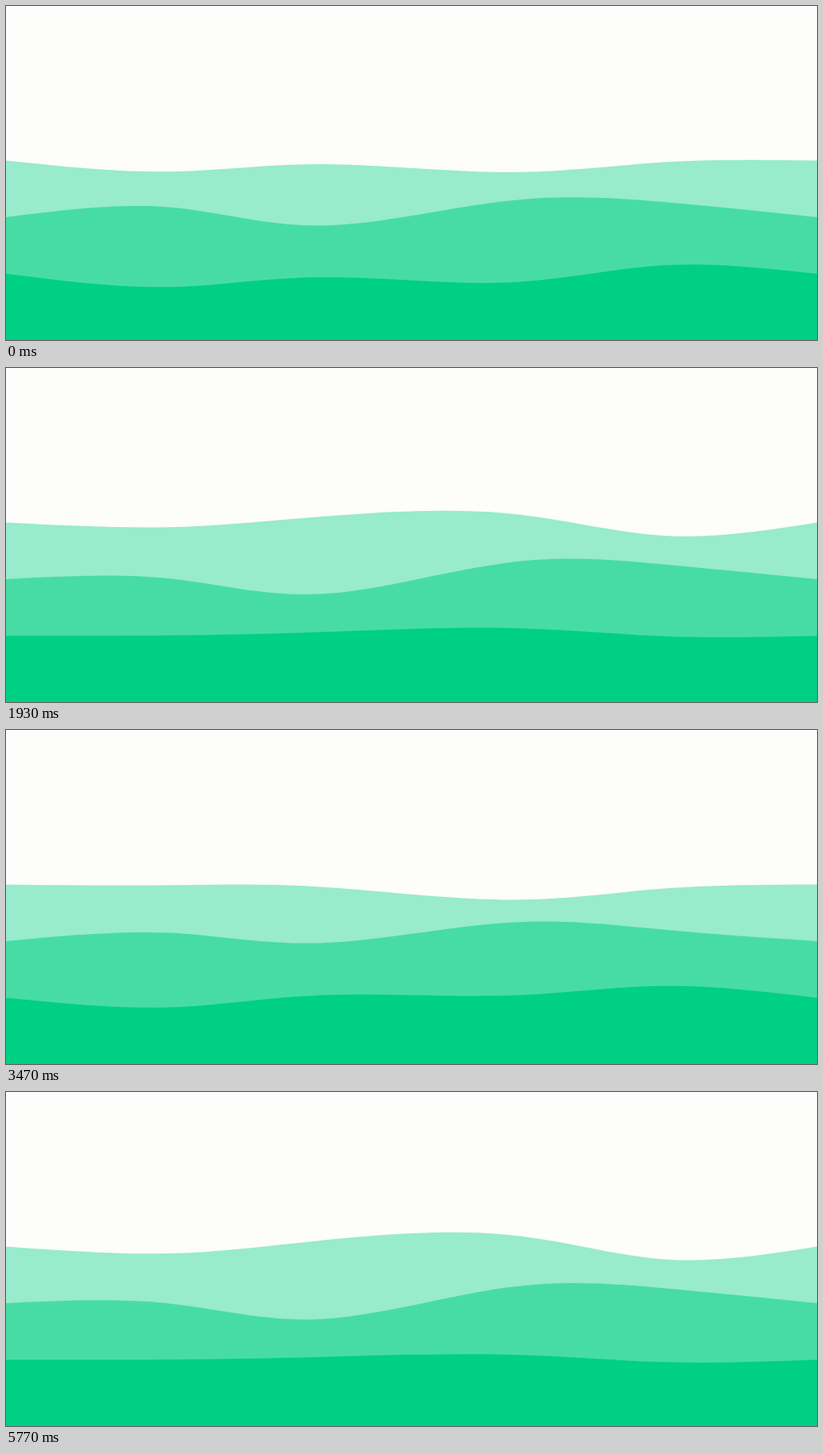
Write an HTML page that moves like this. It is 1008 by 416 pixels and loops after 5.81 s.

```html
<!DOCTYPE html>
<html lang="en">
<head>
<meta charset="utf-8">
<title>Green waves</title>
<style>
html, body { margin: 0; width: 100%; height: 100%; overflow: hidden; background: #fdfdfc; }
svg { display: block; width: 1008px; height: 416px; fill: #00d084; }
</style>
</head>
<body>
<svg viewBox="0 0 1008 416">
  <path fill-opacity=".4"/>
  <path fill-opacity=".53"/>
  <path/>
</svg>
<script>
const W = 1008, H = 416;
const LOOP = 5810, FPS = 30, FRAMES = 174;
const POSE_MS = 1000, FIRST_POSE = 840;
const TOP = 192.5, GAP = 70.5;

// Waves hang on shared columns; each has four poses: heights at the inner columns
const xs = [0, 0.2, 0.39, 0.615, 0.81, 1].map(k => k * W);
const waves = [
  [[10, -4, -22, 0], [8.5, -8, -14.5, 17], [-22, -2, 14.5, 9.5], [14.5, 6, 21.5, 2.5]],
  [[22, -8, -14.5, 2], [-1.5, 22, -19.5, -20.5], [4, -17.5, -26, 0], [-19, 14, -21, -23]],
  [[3.5, -10, 18.5, 13], [-0.5, -3, -8.5, 2], [0, -20.5, -23, -14.5], [19, 7, 9.5, -15]]
];
const paths = document.querySelectorAll("path");

// Tangents of a natural cubic spline with evenly spaced knots
function tangents(p) {
  const n = p.length - 1, c = [0.5], d = [1.5 * (p[1] - p[0])];
  for (let i = 1; i <= n; i++) {
    const last = i === n;
    c[i] = 1 / ((last ? 2 : 4) - c[i - 1]);
    d[i] = c[i] * (3 * (p[last ? n : i + 1] - p[i - 1]) - d[i - 1]);
  }
  for (let i = n - 1; i >= 0; i--) d[i] -= c[i] * d[i + 1];
  return d;
}

const dx = tangents(xs);

function wavePath(ys) {
  const dy = tangents(ys);
  const at = (i, k) =>
    (xs[i] + k * dx[i] / 3).toFixed(2) + "," + (ys[i] + k * dy[i] / 3).toFixed(2);
  let path = `M0,${H}L${at(0, 0)}`;
  for (let i = 1; i < xs.length; i++) path += `C${at(i - 1, 1)} ${at(i, -1)} ${at(i, 0)}`;
  return path + `L${W},${H}Z`;
}

function draw(ms) {
  const step = Math.min(Math.floor((ms % LOOP + 4) * FPS / 1000), FRAMES - 1);
  const phase = ((step * 1000 / FPS - FIRST_POSE) / POSE_MS + 4) % 4;
  const from = Math.floor(phase), mix = phase - from;
  waves.forEach((poses, i) => {
    const base = TOP + i * GAP, next = poses[(from + 1) % 4];
    const inner = poses[from].map((y, k) => base + y + (next[k] - y) * mix);
    paths[i].setAttribute("d", wavePath([base, ...inner, base]));
  });
}

const start = performance.now();
function tick() {
  draw(performance.now() - start);
  requestAnimationFrame(tick);
}
tick();
</script>
</body>
</html>
```
